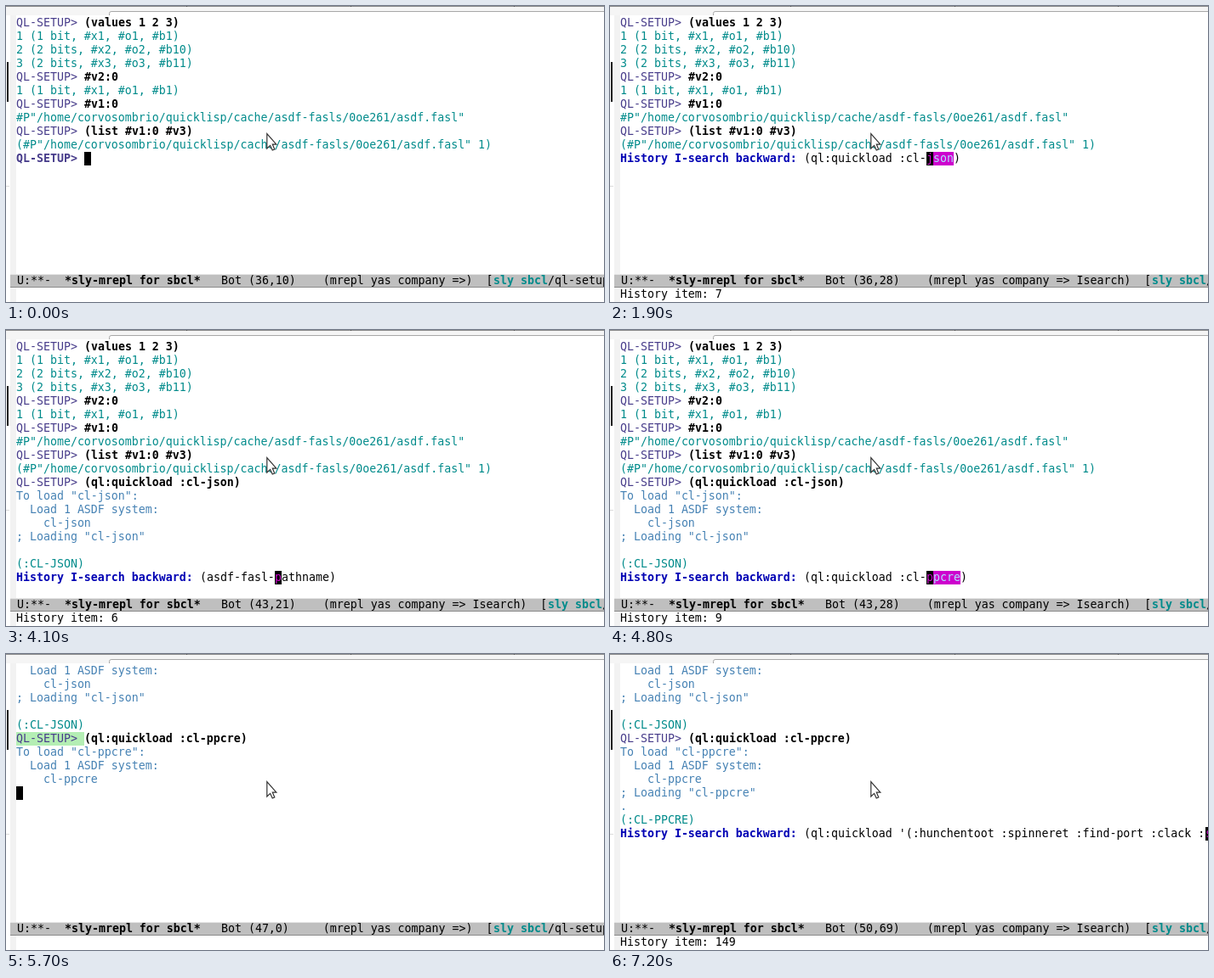
These frames come from a looping animation (703x349 px, 8000 ms). An HTML page:

```html
<!DOCTYPE html>
<html lang="en">
<head>
<meta charset="utf-8">
<title>Lisp REPL history search</title>
<style>
  html, body { margin: 0; width: 100%; height: 100%; overflow: hidden; background: #fff; }
  svg { display: block; width: 703px; height: 349px; }
  text { font: 13.288px "DejaVu Sans Mono", monospace; white-space: pre; fill: #000; }
  .old, .prompt { fill: #483d8b; }
  .val, .mode { fill: #008b8b; }
  .out { fill: #4682b4; }
  .search { fill: #0000b4; }
  .hit { fill: #b0e2ff; }
  .under { fill: #cd00cd; }
  .prompt, .search, .input, .mode, .name { font-weight: bold; }
</style>
</head>
<body>
<svg viewBox="0 0 703 349">
  <rect width="703" height="11" fill="#f5f5f5"/>
  <path d="M122 11V8.500Q122 6.500 124 6.500H703V11Z" fill="#fff"/>
  <path d="M0 .5H703" stroke="#8c8c8c"/>
  <path d="M212.500 0V1M405.500 0V1M597.500 0V1" stroke="#555"/>
  <path d="M121.500 11V8.500Q121.500 6.500 124 6.500H703" fill="none" stroke="#a8a8a8"/>
  <rect x="5" y="11" width="7" height="338" fill="#f2f2f2"/>
  <rect x="1" y="66" width="2" height="47" fill="#1c1c1c"/>
  <path d="M0 212.500H4" stroke="#dcdcdc"/>
  <rect x="5" y="316" width="698" height="16" fill="#bfbfbf"/>
  <path d="M5 316.500H703" stroke="#e5e5e5"/>
  <path d="M5 331.500H703" stroke="#8a8a8a"/>
  <g id="screen"></g>
  <path d="M306.800 150.500V168L310.600 164.400L313.200 170L315.800 168.900L313.300 163.200H317.800Z"
        fill="#fff" stroke="#333" stroke-width="1.200"/>
</svg>
<script>
const LOOP = 8000, CELL = 8, ROW = 16, LEFT = 12, TOP = 12;
const PROMPT = "QL-SETUP> ", SEARCH = "History I-search backward: ";
const JSON_LOAD = "(ql:quickload :cl-json)", PPCRE_LOAD = "(ql:quickload :cl-ppcre)";
const FASL = '#P"/home/corvosombrio/quicklisp/cache/asdf-fasls/0oe261/asdf.fasl"';

const cmd = s => [[PROMPT, "old"], [s, "input"]];
const val = s => [[s, "val"]];
const out = s => [[s, "out"]];
const loading = name => [
  out(`To load "${name}":`), out("  Load 1 ASDF system:"),
  out("    " + name), out(`; Loading "${name}"`)
];

const log = [
  cmd("(values 1 2 3)"),
  val("1 (1 bit, #x1, #o1, #b1)"),
  val("2 (2 bits, #x2, #o2, #b10)"),
  val("3 (2 bits, #x3, #o3, #b11)"),
  cmd("#v2:0"), val("1 (1 bit, #x1, #o1, #b1)"),
  cmd("#v1:0"), val(FASL),
  cmd("(list #v1:0 #v3)"), val(`(${FASL} 1)`),
  cmd(JSON_LOAD), ...loading("cl-json"), out(""), val("(:CL-JSON)"),
  cmd(PPCRE_LOAD), ...loading("cl-ppcre"), out("."), val("(:CL-PPCRE)")
];

// Each state: the log rows shown, the live line below them, and the status lines.
const ready = (t, rows, top = 0) =>
  ({ t, rows, top, line: [[PROMPT, "prompt"]], cursor: 10, col: 10 });

const search = (t, rows, top = 0, text = "", at = 0, len = 0, item = 0) => ({
  t, rows, top, searching: true, cursor: SEARCH.length + at, col: 10 + at,
  line: [[SEARCH, "search"], [text.slice(0, at)], [text.slice(at, at + 1), "under"],
         [text.slice(at + 1, at + len), "hit", "#cd00cd"], [text.slice(at + Math.max(len, 1))]],
  echo: item ? "History item: " + item : ""
});

const edit = (t, rows, text, paren) => ({
  t, rows, top: 0, cursor: 10 + text.length, col: 10 + text.length,
  line: [[PROMPT, "prompt"], ["(", "", paren], [text.slice(1, -1)], [")", "", paren]],
  echo: "Mark saved where search started"
});

const PAREN = "#40e0d0";
const states = [
  ready(0, 10),
  search(700, 10),
  ...[1400, 1600, 1800, 1900].map((t, i) => search(t, 10, 0, JSON_LOAD, 18, i + 1, 7)),
  edit(2100, 10, JSON_LOAD),
  edit(2200, 10, JSON_LOAD, PAREN),
  ready(2700, 17),
  search(3600, 17),
  search(4100, 17, 0, "(asdf-fasl-pathname)", 11, 1, 6),
  ...[4300, 4400, 4700, 4800].map((t, i) => search(t, 17, 0, PPCRE_LOAD, 18, i + 2, 9)),
  edit(5200, 17, PPCRE_LOAD),
  edit(5300, 17, PPCRE_LOAD, PAREN),
  { t: 5700, rows: 21, top: 12, line: [], cursor: 0, col: 0, flash: 17 },
  ready(5800, 24, 12),
  search(6700, 24, 12),
  search(7100, 24, 12, JSON_LOAD, 19, 1, 2),
  search(7200, 24, 12, "(ql:quickload '(:hunchentoot :spinneret :find-port :clack :s", 59, 1, 149)
];

const screen = document.getElementById("screen");

function add(tag, attrs, text = "") {
  const el = document.createElementNS("http://www.w3.org/2000/svg", tag);
  for (const k in attrs) el.setAttribute(k, attrs[k]);
  el.textContent = text;
  screen.append(el);
}

function block(row, col, n, fill) {
  add("rect", { x: LEFT + col * CELL, y: TOP + row * ROW, width: n * CELL, height: ROW, fill });
}

function print(row, runs, left = LEFT) {
  let col = 0;
  for (const [text, cls = "", back] of runs) {
    if (back) block(row, col, text.length, back);
    if (text) add("text", { x: left + col * CELL, y: TOP + row * ROW + 12, class: cls }, text);
    col += text.length;
  }
}

function draw(s) {
  screen.replaceChildren();
  const live = s.rows - s.top;
  if (s.flash) block(s.flash - s.top, 0, PROMPT.length, "#b4eeb4");
  log.slice(s.top, s.rows).forEach((runs, row) => print(row, runs));
  block(live, s.cursor, 1, "#000");
  print(live, s.line);
  const pos = `   Bot (${26 + s.rows},${s.col})`.padEnd(18);
  // The mode line's border pushes its text one pixel right.
  print(19, [
    ["U:**-  "], ["*sly-mrepl for sbcl*", "name"],
    [`${pos}(mrepl yas company =>${s.searching ? " Isearch" : ""})  [`],
    ["sly sbcl", "mode"], ["/ql-setup"]
  ], LEFT + 1);
  print(20, [[s.echo || ""]]);
}

let shown;
function tick() {
  const t = performance.now() % LOOP;
  const s = states.findLast(s => s.t <= t);
  if (s !== shown) draw(shown = s);
  requestAnimationFrame(tick);
}
tick();
</script>
</body>
</html>
```
